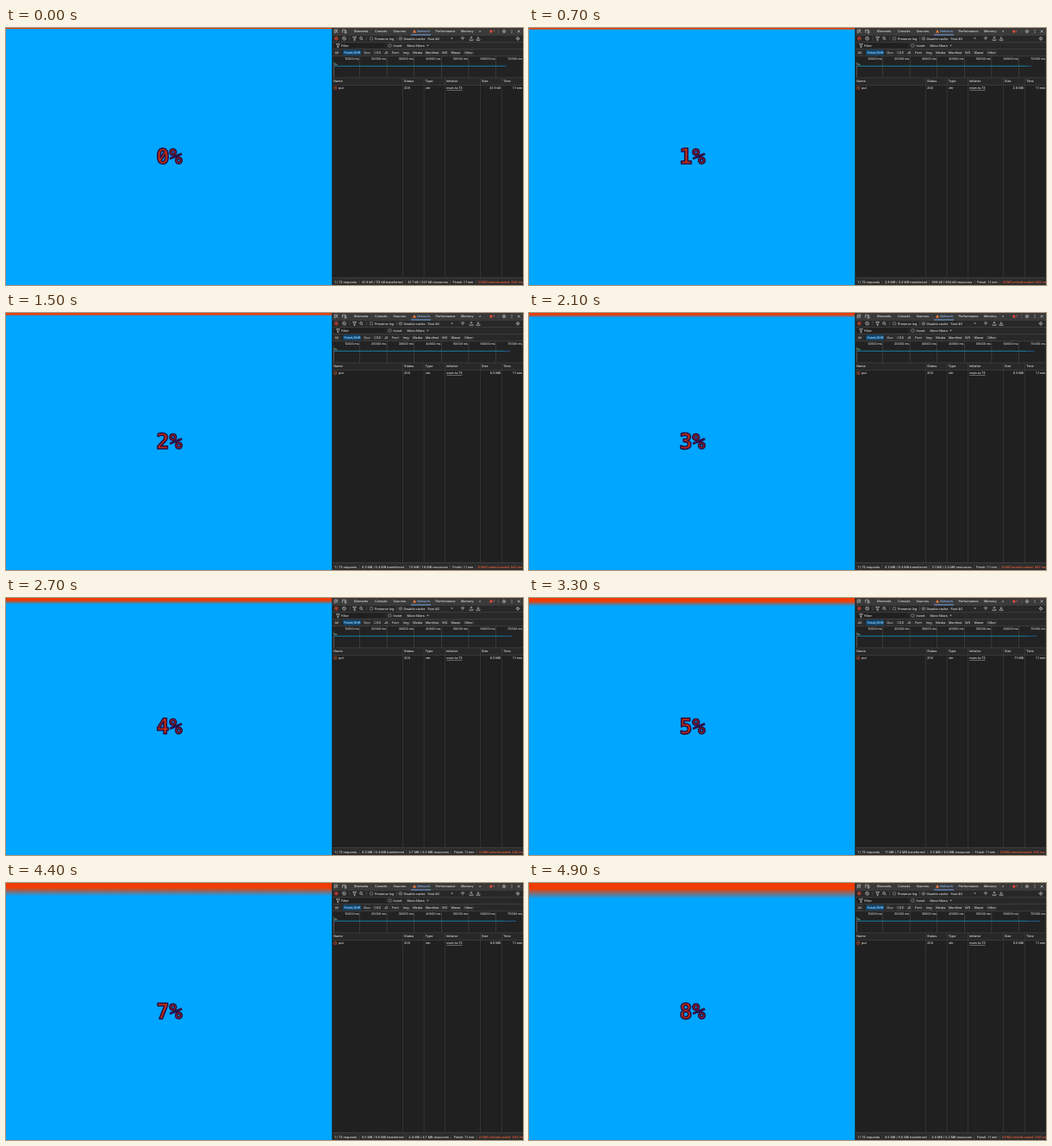
Write an HTML page that moves like this. It is 600x299 px and loops after 5000 ms.

```html
<!DOCTYPE html>
<html lang="en">
<head>
<meta charset="utf-8">
<title>Upload progress</title>
<style>
  html, body { margin: 0; width: 100%; height: 100%; overflow: hidden; background: #00a6ff; }
  svg { display: block; width: 600px; height: 299px; }
  text { font: 500 3.7px Inter, "Liberation Sans", sans-serif; fill: #dcdcdc; white-space: pre; text-rendering: geometricPrecision; }
  #percent text {
    font: bold 25px "DejaVu Sans Mono", monospace;
    fill: #c92c0c; stroke: #2b1148; stroke-width: 1.6; stroke-linejoin: round;
  }
  #percent .zero { font-family: "Noto Sans Mono", "DejaVu Sans Mono", monospace; }
  .icon { fill: none; stroke: #c4c4c4; stroke-width: .7; }
  .end { text-anchor: end; }
  .sep { fill: #666; }
</style>
</head>
<body>
<svg viewBox="0 0 600 299">
  <defs>
    <linearGradient id="fill" gradientUnits="userSpaceOnUse" x1="0" x2="0" y1="0" y2="2">
      <stop stop-color="#f03c00"/>
      <stop offset="1" stop-color="#00a6ff"/>
    </linearGradient>
  </defs>
  <rect width="379" height="299" fill="#00a6ff"/>
  <rect width="379" height="40" fill="url(#fill)"/>
  <g id="percent">
    <text id="digit" x="174.4" y="158.4">0</text>
    <text x="189.5" y="158.4">%</text>
  </g>
  <g id="panel"></g>
  <text id="size" class="end" x="574" y="71.2"></text>
  <text x="381.3" y="296.6">1 / 72 requests<tspan class="sep" dx="2.4">|</tspan><tspan id="sent" dx="2.4"></tspan><tspan class="sep" dx="2.2">|</tspan><tspan id="used" dx="2.2"></tspan><tspan class="sep" dx="2.2">|</tspan><tspan dx="2.2">Finish: 1.1 min</tspan><tspan class="sep" dx="2.2">|</tspan><tspan dx="2.2" fill="#f0603c">DOMContentLoaded: 942 ms</tspan></text>
  <path id="tail" stroke="#2470b0" stroke-width=".8"/>
</svg>
<script>
const $ = id => document.getElementById(id);
const parts = [];
const rect = (x, y, w, h, fill, more = '') =>
  parts.push(`<rect x="${x}" y="${y}" width="${w}" height="${h}" fill="${fill}" ${more}/>`);
const label = (x, y, s, more = '') => parts.push(`<text x="${x}" y="${y}" ${more}>${s}</text>`);
const icon = (d, more = '') => parts.push(`<path class="icon" d="${d}" ${more}/>`);
const ring = (x, y, r, more = '') => parts.push(`<circle class="icon" cx="${x}" cy="${y}" r="${r}" ${more}/>`);
const hline = y => rect(379, y, 221, .6, '#484848');
const check = (x, y) => rect(x - 1.6, y - 1.6, 3.2, 3.2, 'none', 'rx=".5" stroke="#999" stroke-width=".6"');
const funnel = (x, y) => icon(`M${x - 2} ${y - 1.8}h4l-1.5 2v2h-1v-2z`);
const arrow = (x, y) => icon(`M${x - 1.2} ${y - .7}h2.4l-1.2 1.5z`, 'style="fill:#c4c4c4;stroke:none"');
const gear = (x, y) => {
  ring(x, y, 1.8, 'stroke-dasharray=".8 .6"');
  ring(x, y, 1.2);
};

function buildPanel() {
  rect(378.5, 0, 221.5, 299, '#282828');
  rect(379, 0, 221, 8, '#3a3a3a');
  rect(379, 33, 221, 25, '#222');
  rect(379, 66, 221, 224, '#202020');
  rect(379, 290.5, 221, 8.5, '#2c2c2c');
  rect(378.3, 0, .8, 299, '#1b2a34');
  [8, 16, 24.3, 32.5, 57.6, 66, 290].forEach(hline);

  // Tabs
  icon('M384.8 3.2v-1.2h-3.6v3.6h1.4M383 3.6l2.2 2.2m-2.2-.7v-1.5h1.5');
  icon('M390.4 5.6v-3.4h4M393.2 3.2h1.6v2.8h-1.6z');
  [[404, 'Elements'], [428, 'Console'], [449.5, 'Sources'], [498.5, 'Performance'], [528, 'Memory'], [549, '»']]
    .forEach(([x, s]) => label(x, 5.2, s));
  icon('M474 1.8l2.2 3.8h-4.4z', 'style="fill:#e8783c;stroke:none"');
  label(477, 5.2, 'Network', 'style="fill:#8ab8f8"');
  rect(470, 7.5, 23, .9, '#7cacf8');
  rect(561.4, 2.4, 3, 3, '#e64a3c', 'rx=".6"');
  label(565.6, 5.2, '1', 'style="fill:#f0806c"');
  rect(571, 1.5, .5, 5, '#666');
  gear(578, 3.9);
  [2.2, 3.9, 5.6].forEach(y => ring(587, y, .2));
  icon('M593.6 2.4l3 3m0-3l-3 3');

  // Toolbar
  ring(383.3, 12.2, 1.9, 'style="stroke:#e64632"');
  ring(383.3, 12.2, .7, 'style="stroke:#e64632;fill:#e64632"');
  ring(392.5, 12.2, 1.9);
  icon('M391.2 10.9l2.6 2.6');
  rect(398.7, 10, .5, 4.5, '#666');
  funnel(404.5, 12.2);
  ring(412, 11.8, 1.4);
  icon('M413 12.8l1.4 1.4');
  rect(418, 10, .5, 4.5, '#666');
  check(424, 12.3);
  label(428, 13.6, 'Preserve log');
  rect(453, 10, .5, 4.5, '#666');
  check(457.8, 12.3);
  icon('M456.8 12.3l.8.8 1.3-1.6');
  label(461.5, 13.6, 'Disable cache');
  label(489.5, 13.6, 'Fast 4G');
  arrow(517.5, 12.3);
  icon('M527.8 11.6q2.2-2 4.4 0M528.8 12.7q1.2-1 2.4 0M529.6 13.8h.9');
  icon('M540 13.2v-3m-1.3 1.3l1.3-1.3 1.3 1.3M538 13v1.3h4v-1.3');
  icon('M548 10v3m-1.3-1.3l1.3 1.3 1.3-1.3M546 13v1.3h4v-1.3');
  gear(594, 12.3);

  // Filters
  rect(381, 17.5, 59, 5.8, '#202020', 'rx="1"');
  funnel(385.3, 20.4);
  label(389, 21.7, 'Filter');
  check(445.4, 20.4);
  label(449.5, 21.7, 'Invert');
  label(465.5, 21.7, 'More filters');
  arrow(489.5, 20.4);
  rect(391, 25.6, 21, 5.8, '#0c4a78', 'rx="1.2"');
  [[381.5, 'All', 5], [392.5, 'Fetch/XHR', 0], [415.5, 'Doc', 7], [427.3, 'CSS', 7], [439, 'JS', 5],
   [448, 'Font', 8], [461, 'Img', 7], [472.2, 'Media', 10.5], [487, 'Manifest', 15.5], [506, 'WS', 6],
   [516.5, 'Wasm', 10], [532, 'Other', 10]].forEach(([x, s, w]) => {
    if (w) rect(x - 1.3, 25.7, w + 2.2, 5.6, 'none', 'rx="1.2" stroke="#484848" stroke-width=".4"');
    label(x, 29.9, s, w ? '' : 'style="fill:#b8e0ff"');
  });

  // Timeline
  for (let i = 1; i <= 7; i++) {
    const x = 378.6 + i * 31.6;
    rect(x, 33, .6, 24.6, '#4a4a4a');
    label(x - .6, 37.2, `${i}0000 ms`, 'class="end" style="font-size:3.5px"');
  }
  rect(380, 39.5, 1, 17.5, '#555');
  rect(380.3, 41, 3, .8, '#4c8c58');
  rect(381.5, 42.3, 3, .8, '#7a9aa8');
  rect(381, 43.8, 196, .9, '#1489b0');

  // Request table
  [460.3, 484.8, 509.2, 550, 575.2].forEach(x => rect(x, 58, .6, 232, '#404040'));
  [[380.3, 'Name'], [462, 'Status'], [486.7, 'Type'], [511, 'Initiator'], [552, 'Size'], [577, 'Time']]
    .forEach(([x, s]) => label(x, 63.4, s));
  rect(380.7, 68.2, 3, 3.2, 'none', 'rx=".5" stroke="#c85a32" stroke-width=".6"');
  icon('M381.4 69.8h1.7', 'style="stroke:#c85a32"');
  [[386, 'put'], [462, '200'], [487, 'xhr']].forEach(([x, s]) => label(x, 71.2, s));
  label(511.3, 71.2, 'main.ts:73', 'text-decoration="underline"');
  label(599.2, 71.2, '1.1 min', 'class="end"');

  $('panel').innerHTML = parts.join('');
}

// Seconds and MB: handled bytes grow steadily, sent bytes arrive in bursts
const handled = [[0, .0417], [.7, .659], [1.5, 1.5], [4.9, 4.93]];
const bursts = [[0, .0419], [.2, .95], [.5, 2.8], [1.2, 6.3], [3, 7.1], [3.7, 9.5]];

function lerp(points, t) {
  const i = Math.max(1, points.findIndex(p => p[0] >= t));
  const [[a, b], [c, d]] = [points[i - 1], points[i]];
  return b + (d - b) * (t - a) / (c - a);
}
const held = (points, t) => points.filter(p => p[0] <= t).pop()[1];

function bytes(mb) {
  if (mb >= 1) return mb.toFixed(1) + ' MB';
  const kb = mb * 1000;
  return kb.toFixed(kb < 100 ? 1 : 0) + ' kB';
}

function draw() {
  const t = Math.floor(performance.now() % 5000 / 100) / 10;
  const used = lerp(handled, t), sent = held(bursts, t);
  const p = used * 1.64, n = Math.floor(p);

  $('digit').textContent = n;
  $('digit').setAttribute('class', n ? '' : 'zero');

  const end = 1.5 + .4 * p + .21 * p * p;
  const grad = $('fill');
  grad.setAttribute('y1', Math.max(1, end * .35));
  grad.setAttribute('y2', end);

  $('size').textContent = bytes(sent);
  $('sent').textContent = `${bytes(sent)} / ${bytes(sent + .071)} transferred`;
  $('used').textContent = `${bytes(used)} / ${bytes(used + .265)} resources`;
  $('tail').setAttribute('d', `M577 44.3H${581 + t * 2.5}`);
  requestAnimationFrame(draw);
}

buildPanel();
draw();
</script>
</body>
</html>
```
